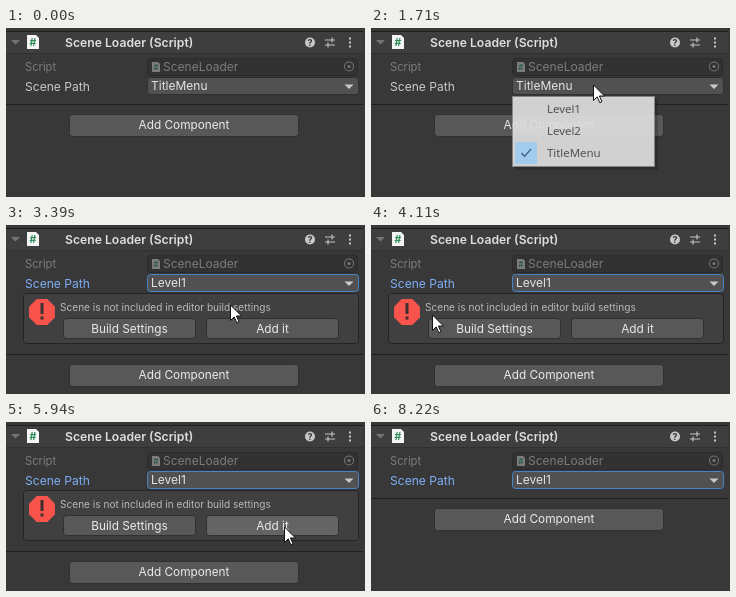
An HTML page with a canvas that plays this animation: 359 px wide and 169 px high, repeating every 8.31 s.

```html
<!DOCTYPE html>
<html lang="en">
<head>
<meta charset="utf-8">
<title>Scene Loader inspector</title>
<style>
  html, body { margin: 0; width: 100%; height: 100%; overflow: hidden; background: #383838; }
  canvas { display: block; }
</style>
</head>
<body>
<canvas id="stage" width="359" height="169"></canvas>
<script>
const ctx = document.getElementById('stage').getContext('2d');
const LOOP = 8310, STEP = 30;
const MENU_OPEN = 1590, MENU_CLOSE = 3300, MENU_FADE = 180;
const ADD_PRESS = 6480, ADD_DONE = 6570;
const POINTER_IN = 270, POINTER_OUT = 7230;
const HELP_SHIFT = 53, ROW = 22;
const MENU_ITEMS = ['Level1', 'Level2', 'TitleMenu'];
const INTER = 'Inter, sans-serif', MENU_FONT = '11.5px "Open Sans", sans-serif';

// Each pointer move eases out towards its goal, then rests there.
const entry = { x: 343, y: 101 };
const moves = [
  { begin: POINTER_IN, end: 1320, x: 222, y: 56 },   // dropdown
  { begin: 2160, end: 2760, x: 224, y: 79 },         // first menu item
  { begin: 3390, end: 4110, x: 61, y: 89 },          // warning icon
  { begin: 4110, end: 4950, x: 144, y: 111 },        // Build Settings
  { begin: 4950, end: 5250, x: 183, y: 110 },
  { begin: 5250, end: 5790, x: 270, y: 104 },        // Add it
  { begin: 5820, end: 6270, x: 288, y: 105 },
  { begin: 7020, end: POINTER_OUT, x: 362, y: 110 }  // off the stage
];

function pointerAt(t) {
  if (t < POINTER_IN || t >= POINTER_OUT) return null;
  let { x, y } = entry;
  for (const move of moves) {
    const k = Math.min(1, Math.max(0, (t - move.begin) / (move.end - move.begin)));
    const eased = 1 - (1 - k) ** 2;
    x += (move.x - x) * eased;
    y += (move.y - y) * eased;
  }
  return { x: Math.round(x), y: Math.round(y) };
}

function rect(x, y, w, h, color) {
  ctx.fillStyle = color;
  ctx.fillRect(x, y, w, h);
}

function panel(x, y, w, h, fill, border) {
  ctx.beginPath();
  ctx.roundRect(x + .5, y + .5, w - 1, h - 1, 3);
  ctx.fillStyle = fill;
  ctx.fill();
  ctx.lineWidth = 1;
  ctx.strokeStyle = border;
  ctx.stroke();
}

function text(str, x, y, color, font = '12px ' + INTER, align = 'left') {
  ctx.font = font;
  ctx.textAlign = align;
  ctx.fillStyle = color;
  ctx.fillText(str, x, y);
}

function disc(x, y, r, color) {
  ctx.beginPath();
  ctx.arc(x, y, r, 0, Math.PI * 2);
  ctx.fillStyle = color;
  ctx.fill();
}

function drawPath(d, color, width) {
  const path = new Path2D(d);
  ctx.fillStyle = ctx.strokeStyle = color;
  ctx.lineWidth = width;
  width ? ctx.stroke(path) : ctx.fill(path);
}

const downArrow = (x, y, size, color) =>
  drawPath(`M${x - size} ${y}h${2 * size}l${-size} ${size}z`, color);

function button(label, x, y, w, h, pointer, pressed) {
  const hover = pointer && pointer.x >= x && pointer.x < x + w && pointer.y >= y && pointer.y < y + h;
  panel(x, y, w, h, pressed ? '#46607c' : hover ? '#646464' : '#585858', '#303030');
  text(label, x + w / 2, y + 15, '#eaeaea', '11.8px ' + INTER, 'center');
}

function scriptIcon(x, y, w, h, paper, ink) {
  const fold = w / 4;
  drawPath(`M${x} ${y}h${w - fold}l${fold} ${fold}v${h - fold}h${-w}z`, paper);
  text('#', x + w / 2, y + h * .8, ink, `bold ${h * .75}px ${INTER}`, 'center');
}

function drawHeader() {
  rect(0, 3, 357, 22, '#3e3e3e');
  rect(0, 3, 357, 1, '#1f1f1f');
  rect(0, 25, 357, 1, '#303030');
  downArrow(9.5, 12, 4.5, '#747474');
  scriptIcon(21, 7, 12, 14, '#f4f4f4', '#2f8b57');
  text('Scene Loader (Script)', 59, 19, '#dedede', '600 12.2px ' + INTER);
  disc(304, 14.5, 5, '#c8c8c8');
  text('?', 304, 18, '#333', 'bold 9px ' + INTER, 'center');
  drawPath('M319 12h10m-10 5h10M326 9.5v5m-4 0v5', '#c4c4c4', 1.2);
  for (let i = -1; i <= 1; i++) rect(343, 13.5 + 4 * i, 2, 2, '#c8c8c8');
}

function drawFields(chosen) {
  text('Script', 19, 43, '#7c7c7c', '11.2px ' + INTER);
  panel(141, 30, 211, 18, '#323232', '#2b2b2b');
  scriptIcon(146, 34, 8, 10, '#7c7c7c', '#2f5c45');
  text('SceneLoader', 157, 43, '#7c7c7c');
  disc(343, 38.5, 5, '#777');
  disc(343, 38.5, 4, '#323232');
  disc(343, 38.5, 1.5, '#777');

  text('Scene Path', 19, 63, chosen ? '#7eaef6' : '#c8c8c8', '12.1px ' + INTER);
  panel(141, 49, 212, 18, '#515151', chosen ? '#4585c6' : '#303030');
  text(chosen ? MENU_ITEMS[0] : MENU_ITEMS[2], 145, 62, '#e4e4e4');
  downArrow(343, 56.5, 4.5, '#cacaca');
}

function drawWarning(x, y, r) {
  ctx.beginPath();
  for (let i = 0; i < 8; i++) {
    const angle = (i + .5) * Math.PI / 4;
    ctx.lineTo(x + r * Math.cos(angle), y + r * Math.sin(angle));
  }
  ctx.fillStyle = '#f9544b';
  ctx.fill();
  rect(x - 1.5, y - 9, 3, 11, '#3c3030');
  rect(x - 1.5, y + 4.5, 3, 3, '#3c3030');
}

function drawHelp(t, pointer) {
  panel(17, 68, 336, 51, '#404040', '#242424');
  drawWarning(36, 87, 14);
  text('Scene is not included in editor build settings', 54, 86, '#b9b9b9', '10.1px ' + INTER);
  button('Build Settings', 57, 93, 133, 21, pointer);
  button('Add it', 200, 93, 133, 21, pointer, t >= ADD_PRESS);
}

function drawMenu(t, pointer) {
  ctx.save();
  ctx.globalAlpha = Math.min(1, (t - MENU_OPEN + STEP) / (MENU_FADE + STEP));
  rect(144, 71, 143, 71, 'rgba(0,0,0,.25)');
  rect(141, 68, 143, 71, '#a5a5a5');
  rect(142, 69, 141, 69, '#f2f2f2');
  if (pointer.y >= 70) rect(144, 70, 137, ROW, '#91c9f7');
  rect(144, 70 + 2 * ROW, ROW, ROW, '#91c9f7');
  drawPath('M150.5 125l3 3.5l6.5 -7.5', '#183f68', 1.4);
  MENU_ITEMS.forEach((name, i) => text(name, 176, 85 + ROW * i, '#111', MENU_FONT));
  ctx.restore();
}

function drawPointer({ x, y }) {
  const arrow = `M${x + .5} ${y + 1}v15.5l3.7 -3.6l2.6 5.8l2.2 -1l-2.6 -5.7h5.1z`;
  drawPath(arrow, '#fff');
  drawPath(arrow, '#111', 1);
}

function draw(time) {
  const t = Math.floor((time % LOOP) / STEP) * STEP;
  const pointer = pointerAt(t);
  const menu = t >= MENU_OPEN && t < MENU_CLOSE;
  const help = t >= MENU_CLOSE && t < ADD_DONE;
  const shift = help ? HELP_SHIFT : 0;

  rect(0, 0, 359, 169, '#383838');
  drawHeader();
  drawFields(t >= MENU_CLOSE);
  if (help) drawHelp(t, pointer);
  rect(0, 76 + shift, 357, 1, '#1f1f1f');
  button('Add Component', 63, 86 + shift, 230, 23, menu ? null : pointer);
  if (menu) drawMenu(t, pointer);
  if (pointer) drawPointer(pointer);
}

const start = performance.now();
function frame() {
  draw(performance.now() - start);
  requestAnimationFrame(frame);
}
frame();
</script>
</body>
</html>
```
